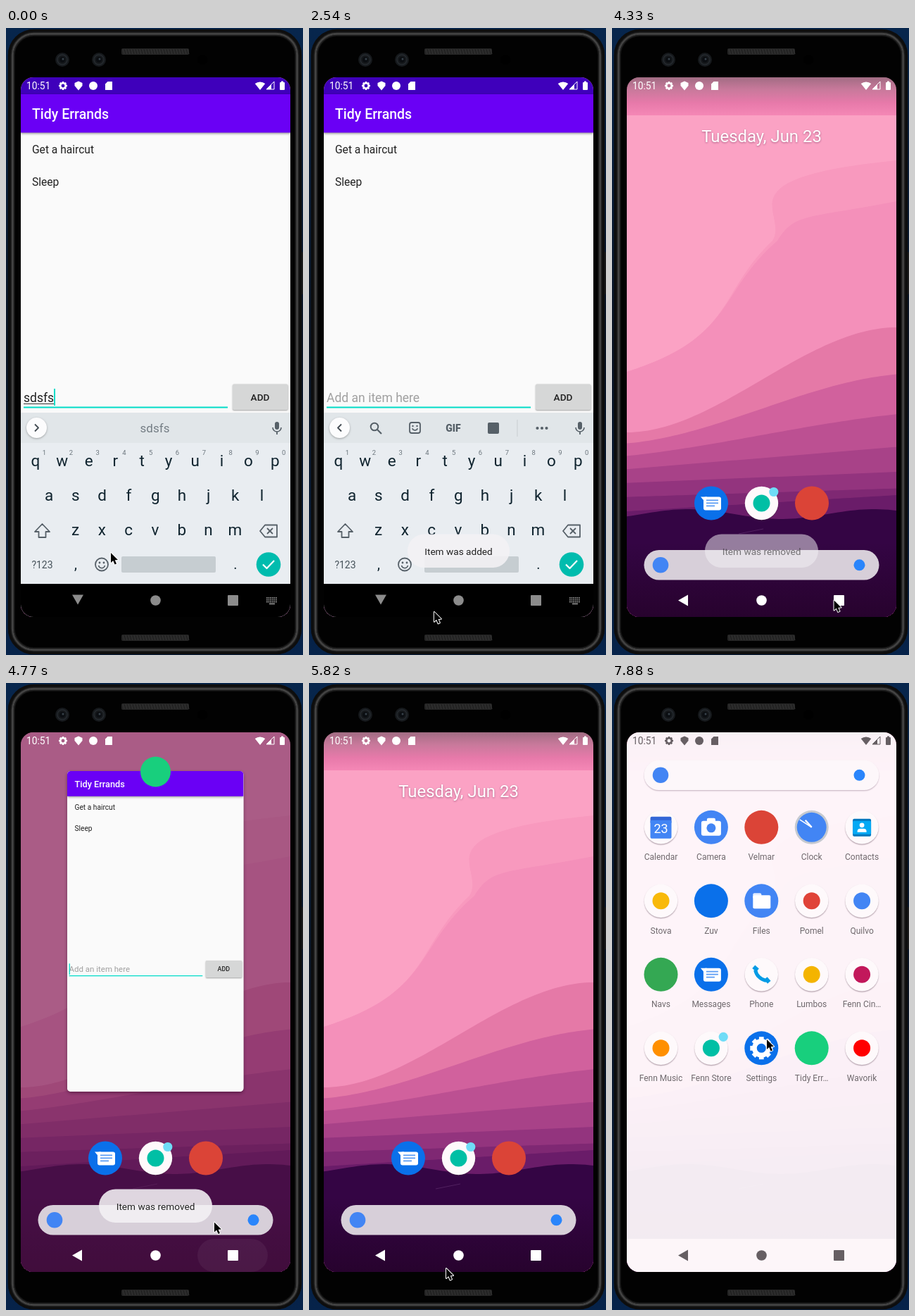
These frames come from a looping animation (422x890 px, 8000 ms). An HTML page with a canvas:

```html
<!DOCTYPE html>
<html lang="en">
<head>
<meta charset="utf-8">
<title>To-do list demo</title>
<style>
html, body { margin: 0; width: 100%; height: 100%; overflow: hidden; background: #04162f; }
canvas { display: block; width: 422px; height: 890px; }
</style>
</head>
<body>
<canvas id="stage" width="422" height="890"></canvas>
<script>
const ctx = document.getElementById('stage').getContext('2d');
const LOOP = 8000, STEP = 148.7;
const APP = 'Tidy Errands', TEAL = '#00dcc8', KEY = '#10242f', GREY = '#566068', BLUE = '#0a70ea', GREEN = '#18cf7d';
const ADD = 740, ADDED = 880, REMOVED = 2070, HOME = 3560, CLOSE = 3840, DRAG = 6800, RELEASE = 7290;

const clamp = v => Math.max(0, Math.min(1, v));
const span = (t, a, b) => clamp((t - a) / (b - a));
const mix = (a, b, k) => a + (b - a) * k;

// Drawing helpers
function box(x, y, w, h, r, fill) {
  ctx.beginPath();
  ctx.roundRect(x, y, w, h, r);
  if (fill) { ctx.fillStyle = fill; ctx.fill(); }
}
function frameBox(x, y, w, h, r, color, lw) {
  box(x, y, w, h, r);
  ctx.strokeStyle = color;
  ctx.lineWidth = lw;
  ctx.stroke();
}
function dot(x, y, r, fill) {
  ctx.beginPath();
  ctx.arc(x, y, r, 0, 7);
  ctx.fillStyle = fill;
  ctx.fill();
}
function ring(x, y, r, color, w = 1.5, a = 0, b = 7) {
  ctx.beginPath();
  ctx.arc(x, y, r, a, b);
  ctx.strokeStyle = color;
  ctx.lineWidth = w;
  ctx.stroke();
}
function trace(pts, x = 0, y = 0) {
  ctx.beginPath();
  for (let i = 0; i < pts.length; i += 2) ctx.lineTo(x + pts[i], y + pts[i + 1]);
}
function poly(pts, fill, x, y) {
  trace(pts, x, y);
  ctx.fillStyle = fill;
  ctx.fill();
}
function line(pts, color, w, x, y, close) {
  trace(pts, x, y);
  if (close) ctx.closePath();
  ctx.strokeStyle = color;
  ctx.lineWidth = w;
  ctx.stroke();
}
function text(s, x, y, size, color, align = 'left', weight = 400) {
  ctx.font = `${weight} ${size}px Roboto, sans-serif`;
  ctx.textAlign = align;
  ctx.fillStyle = color;
  ctx.fillText(s, x, y);
}
function fade(y, h, ...colors) {
  const g = ctx.createLinearGradient(0, y, 0, y + h);
  colors.forEach((c, i) => g.addColorStop(i / (colors.length - 1), c));
  return g;
}
function shadow(color, blur, dy) {
  ctx.shadowColor = color;
  ctx.shadowBlur = blur;
  ctx.shadowOffsetY = dy;
}
function group(alpha, draw) {
  if (alpha <= 0) return;
  ctx.save();
  ctx.globalAlpha *= alpha;
  draw();
  ctx.restore();
}
function gear(x, y, r, color) {
  for (let i = 0; i < 8; i++) {
    const a = i * Math.PI / 4, c = r * Math.cos(a), s = r * Math.sin(a);
    line([c * .6, s * .6, c, s], color, r * .42, x, y);
  }
  ring(x, y, r * .62, color, r * .42);
}

// Pointer strokes: start, end, and where each one leads
const MOVES = [
  [100, ADD, 362, 522], [900, 1487, 159, 265], [2240, 2520, 177, 829], [2520, 2830, 211, 823],
  [3900, 4330, 320, 812], [4480, 4758, 296, 766], [4758, 5353, 225, 53], [5353, 5700, 195, 831],
  [5900, DRAG, 183, 632], [DRAG, RELEASE, 177, 279], [RELEASE, 7881, 220, 506]
];
function pointerAt(t) {
  return MOVES.reduce(([x, y], [a, b, toX, toY]) => {
    const k = span(t, a, b);
    return [mix(x, toX, k), mix(y, toY, k)];
  }, [149, 745]);
}
// The drawer follows the drag, then settles by itself
function drawerAt(t) {
  if (t < DRAG) return 0;
  const pulled = (632 - pointerAt(Math.min(t, RELEASE))[1]) / 631.5;
  return mix(pulled, 1, 1 - (1 - span(t, RELEASE, 7590)) ** 2);
}
function pointer(t) {
  const arrow = [0, 0, 0, 14, 3.2, 11, 5.6, 16.5, 8, 15.4, 5.7, 10.2, 10, 10];
  ctx.lineJoin = 'round';
  line(arrow, '#fff', 2, ...pointerAt(t), true);
  poly(arrow, '#000', ...pointerAt(t));
}

// Phone
function body() {
  ctx.fillStyle = fade(0, 890, '#07264d', '#0b1524', '#06234a');
  ctx.fillRect(0, 0, 422, 890);
  box(419, 318, 3, 60, 1, '#1c1d1f');
  box(3, 2, 417, 887, 37, '#0a0a0a');
  for (let i = 0; i < 9; i++) {
    const v = 14 + 62 * Math.exp(-(((i - 6) / 1.7) ** 2));
    frameBox(3.5 + i, 2.5 + i, 416 - 2 * i, 886 - 2 * i, 36 - i, `rgb(${v},${v},${v})`, 1.4);
  }
  box(13, 12, 397, 867, 27, '#020202');
  for (const y of [29, 861]) {
    box(164, y, 96, 9, 2, '#242424');
    for (let x = 166; x < 260; x += 4) line([x, y + 1, x + 2, y + 8], '#353535', 1);
  }
  for (const x of [80, 132]) {
    dot(x, 45, 10, '#16191c');
    ring(x, 45, 7, '#252a2f', 1.5);
    dot(x, 45, 4, '#0b0e12');
    dot(x + 1, 44, 1.5, '#38424a');
  }
  dot(279, 45, 7, '#000');
}

function statusBar(color) {
  text('10:51', 29, 87, 13.8, color);
  gear(81, 82, 6, color);
  poly([0, -6.5, 5.5, -4, 5.5, 0, 0, 6.5, -5.5, 0, -5.5, -4], color, 103, 82);
  dot(124, 82, 6, color);
  poly([0, 3.5, 3.5, 0, 10, 0, 10, 12, 0, 12], color, 141, 76);
  ctx.beginPath();
  ctx.moveTo(361, 88);
  ctx.arc(361, 88, 11.5, -2.25, -.89);
  ctx.fill();
  line([0, 0, 11, 0, 11, -11], color, 1, 370, 87, true);
  poly([0, 0, 7, 0, 7, -7], color, 370, 87);
  box(389, 77, 7, 11, 1, color);
  box(391, 75.5, 3, 2, 0, color);
}

function navIcons(color, keyboard) {
  if (keyboard) poly([-8, -6.5, 8, -6.5, 0, 7.5], color, 102, 811);
  else poly([7, -8, 7, 8, -7, 0], color, 101, 812.5);
  dot(212.5, 812.5, 7.3, color);
  box(315, 805, 15, 15, 1, color);
}

// To-do screen
function todo(t) {
  box(21, 94, 383, 742, 0, '#fafafa');
  group(1, () => {
    shadow('rgba(0,0,0,.4)', 3, 1);
    box(21, 94, 383, 54.5, 0, '#6a00f5');
  });
  text(APP, 37, 128.5, 19.5, '#fff', 'left', 500);
  const added = t >= ADDED, rows = ['Get a haircut', 'Sleep'];
  if (added && t < REMOVED) rows.push('sdsfs');
  rows.forEach((s, i) => text(s, 37, 177.5 + i * 46.8, 15.6, '#222'));

  if (added) text('Add an item here', 25, 530.5, 17.55, '#a0a0a0');
  else {
    text('sdsfs', 25, 530.5, 17.55, '#222');
    box(25, 533, 43, 1, 0, '#333');
  }
  const blink = Math.floor((t - 788) / 480) % 2 === 0;
  if (!added || t > CLOSE || blink) box(added ? 25 : 68, 512, 2, 24, 0, TEAL);
  box(25, 537.5, 290, 2, 0, TEAL);

  group(1, () => {
    shadow('rgba(0,0,0,.35)', 2, 1);
    box(322, 505.5, 78.5, 36.5, 2, t > ADD && t < 1040 ? '#bcbdbd' : '#d6d7d7');
  });
  text('ADD', 361, 528.5, 13.65, '#222', 'center', 500);
}

function toolStrip(open) {
  box(21, 546, 383, 43, 0, '#e1e6e9');
  group(1, () => {
    shadow('rgba(0,0,0,.3)', 3, 1);
    dot(43.5, 567.5, 14.5, '#fcfcfd');
  });
  const d = open ? -2.5 : 2.5;
  line([-d, -5, d, 0, -d, 5], '#424b52', 1.8, 43.5, 567.5);
  if (open) {
    ring(93, 566, 5.3, GREY, 2);
    line([97, 570, 103, 576], GREY, 2.2);
    frameBox(143, 560, 15, 15, 3, GREY, 1.8);
    for (const x of [147.5, 153.5]) dot(x, 565, 1.2, GREY);
    ring(150.5, 567, 4, GREY, 1.5, .3, 2.84);
    text('GIF', 205, 572.5, 14, GREY, 'center', 900);
    box(254, 560, 16, 16, 2, GREY);
    box(295.5, 556, 1, 24, 0, '#c9ced2');
    for (const x of [324.5, 331, 337.5]) dot(x, 568, 2.1, GREY);
  } else text('sdsfs', 211.5, 574, 17, '#747d84', 'center');
  box(382, 559, 6, 11, 3, GREY);
  ring(385, 567, 6, GREY, 1.6, 0, Math.PI);
  line([385, 573, 385, 577], GREY, 1.8);
}

function keyboard(t) {
  box(21, 588, 383, 201, 0, '#e9edf1');
  toolStrip(t >= ADDED);
  const row = (keys, x, y) => [...keys].forEach((c, i) => text(c, x + i * 37.8, y, 22.5, KEY, 'center'));
  row('qwertyuiop', 42, 621.5);
  row('asdfghjkl', 61, 670.5);
  row('zxcvbnm', 98.5, 720);
  for (let i = 0; i < 10; i++) text((i + 1) % 10, 54.5 + i * 37.8, 606, 9.5, '#6c767d', 'center');
  line([0, -10, 10.5, 1, 5, 1, 5, 9, -5, 9, -5, 1, -10.5, 1], GREY, 1.8, 51.5, 714, true);
  line([-12, 0, -5, -8.5, 12, -8.5, 12, 8.5, -5, 8.5], GREY, 1.8, 373, 714, true);
  for (const d of [-4, 4]) line([-2, d, 6, -d], GREY, 1.8, 373, 714);
  text('?123', 51.5, 767, 14, '#46525a', 'center');
  text(',', 99, 768, 20, KEY, 'center');
  ring(136, 761.5, 9, GREY, 1.8);
  for (const x of [133, 139]) dot(x, 759, 1.4, GREY);
  ring(136, 762, 4.6, GREY, 1.7, .2, 2.94);
  box(164, 750, 134, 23, 2, '#c6cdd1');
  text('.', 326, 768, 20, KEY, 'center');
  dot(373, 761.5, 17.3, '#00bcae');
  line([-8, 0, -2.5, 5.5, 8, -5.5], '#fff', 2.2, 373, 761.5);
}

function appScreen(t) {
  const dy = 112 * span(t, CLOSE, CLOSE + 250) ** 1.5, home = t > HOME;
  group(1, () => {
    ctx.translate(0, dy);
    box(21, 70, 383, 24.5, 0, '#3f00bb');
    todo(t);
    keyboard(t);
  });
  box(21, 789 + dy, 383, 50, 0, '#000');
  if (home) box(160, 789 + dy, 105, 47 - dy, 23, '#222');
  navIcons(home ? '#fff' : '#8c8c8c', true);
  if (!home) {
    for (let i = 0; i < 18; i++)
      box(370 + i % 6 * 2.6, 808 + Math.floor(i / 6) * 2.8, 1.7, 1.8, 0, '#8c8c8c');
    box(374, 816.5, 8, 1.8, 0, '#8c8c8c');
  }
  statusBar('#fff');
}

// Launcher
function ridge(color, height) {
  ctx.beginPath();
  ctx.moveTo(21, 840);
  for (let x = 21; x <= 405; x += 6) ctx.lineTo(x, height(x));
  ctx.lineTo(405, 840);
  ctx.fillStyle = color;
  ctx.fill();
}
function cloud(color, tipX, bulge, edge) {
  ctx.beginPath();
  ctx.moveTo(21, 488);
  ctx.bezierCurveTo(175, 440, 150, 375, tipX, 302);
  ctx.bezierCurveTo(tipX + 25, 262, bulge, edge + 25, 404, edge);
  ctx.lineTo(404, 840);
  ctx.lineTo(21, 840);
  ctx.fillStyle = color;
  ctx.fill();
}
function wallpaper() {
  box(21, 70, 383, 766, 0, '#fba2c4');
  cloud('#f899be', 228, 150, 188);
  cloud('#f490ba', 235, 275, 246);
  for (let i = 0; i < 7; i++) {
    const k = i / 6, left = 574 + 112 * k ** 1.1, right = 663 - 238 * (1 - k) ** 1.8;
    ridge(`rgb(${mix(229, 106, k)},${mix(121, 28, k ** .75)},${mix(167, 105, k)})`, x => {
      const u = (x - 21) / 383;
      return mix(left, right, mix(u * u * (3 - 2 * u), u, Math.min(1, k * 2)));
    });
  }
  ridge('#340544', x => 690 - 7 * Math.cos((x - 108) / 42));
  line([180, 718, 215, 711], 'rgba(110,60,125,.5)', 1);
  box(21, 730, 383, 106, 0, fade(730, 106, 'rgba(36,2,40,0)', 'rgba(36,2,40,.8)'));
}

function white(x, y, mark) {
  group(1, () => {
    shadow('rgba(70,40,60,.4)', 1.5, 1.2);
    dot(x, y, 23.7, '#fef9fb');
  });
  if (mark) dot(x, y, 12, mark);
}
const plain = color => (x, y) => dot(x, y, 24, color);
const marked = color => (x, y) => white(x, y, color);

function calendar(x, y) {
  white(x, y);
  box(x - 15, y - 15, 30, 10, 2, '#3367d6');
  box(x - 15, y - 10, 30, 26, 2, '#4285f4');
  text('23', x, y + 8, 18, '#fff', 'center');
}
function camera(x, y) {
  dot(x, y, 24, '#4285f4');
  box(x - 6, y - 13, 12, 8, 2, '#fff');
  box(x - 14, y - 9, 28, 21, 3, '#fff');
  dot(x, y + 1, 6.5, '#4285f4');
}
function clock(x, y) {
  dot(x, y, 24, '#c5c9d0');
  dot(x, y, 21, '#4285f4');
  line([-17, -11, 0, 0], '#fff', 1.6, x, y);
  line([-9, -10, 0, 0], '#fff', 2.4, x, y);
}
function contacts(x, y) {
  white(x, y);
  box(x - 13, y - 12, 26, 25, 2, '#0277bd');
  box(x - 13, y - 9, 26, 19, 2, '#03a9f4');
  dot(x, y - 3, 3.4, '#fff');
  box(x - 6.5, y + 2, 13, 5, [4, 4, 0, 0], '#fff');
}
function folder(x, y) {
  dot(x, y, 24, '#4285f4');
  box(x - 12, y - 11, 12, 8, 2, '#e3edff');
  box(x - 12, y - 8, 25, 19, 2, '#fff');
}
function bubble(x, y) {
  dot(x, y, 24, BLUE);
  box(x - 11, y - 9, 25, 19, 3, '#fff');
  poly([-15, -9, -6, -9, -9, -2], '#fff', x, y);
  for (const d of [-5, -1, 3]) box(x - 7, y + d, d > 2 ? 12 : 17, 1.8, 0, '#5a9cf4');
}
function handset(x, y) {
  white(x, y);
  ring(x + 10, y - 10, 19, '#039be5', 5, 1.75, 2.95);
  line([-11, -11, -5.5, -6], '#039be5', 6, x, y);
  line([6, 5.5, 11, 11], '#039be5', 6, x, y);
}
function settings(x, y) {
  dot(x, y, 24, BLUE);
  gear(x, y, 16, '#fff');
}
function store(x, y) {
  white(x, y, '#00bfa5');
  dot(x + 17.3, y - 16, 6.6, '#6fdcf7');
}
const browser = plain('#db4437');
const APPS = [
  ['Calendar', calendar], ['Camera', camera], ['Velmar', browser], ['Clock', clock], ['Contacts', contacts],
  ['Stova', marked('#f8b90a')], ['Zuv', plain(BLUE)], ['Files', folder], ['Pomel', marked('#e04338')], ['Quilvo', marked('#4285f4')],
  ['Navs', plain('#34a853')], ['Messages', bubble], ['Phone', handset], ['Lumbos', marked('#f4b400')], ['Fenn Cin…', marked('#c2185b')],
  ['Fenn Music', marked('#ff8f00')], ['Fenn Store', store], ['Settings', settings], ['Tidy Err…', plain(GREEN)], ['Wavorik', marked('#f00')]
];

function searchBar(y, raised) {
  group(1, () => {
    if (raised) shadow('rgba(90,50,80,.3)', 1.5, 1.2);
    box(45.5, y - 21.3, 334, 42.6, 21.3, raised ? '#fdf7fa' : '#d7cfd9');
  });
  dot(69, y, 11.3, '#4285f4');
  dot(351.5, y, 8, '#2a85fb');
}

function card(t, shown) {
  const lift = 620 * span(t, 5040, 5380), k = mix(.9, 1, shown);
  group(shown * (1 - span(t, 5200, 5400)), () => {
    ctx.translate(212.5, 352 - lift);
    ctx.scale(k, k);
    ctx.translate(-212.5, -352);
    group(1, () => {
      shadow('rgba(30,0,25,.45)', 5, 2);
      box(87, 125, 250.5, 455, 5, '#fafafa');
    });
    group(1, () => {
      box(87, 125, 250.5, 455, 5);
      ctx.clip();
      ctx.translate(87, 125);
      ctx.scale(.654, .654);
      ctx.translate(-21, -94);
      todo(t);
    });
    dot(212.5, 126, 21.5, GREEN);
  });
}

function drawer(p) {
  const top = 70 + 643 * (1 - p);
  const alpha = p < .38 ? p * 2.28 : mix(.865, .945, (p - .38) / .62);
  box(21, top, 383, 840 - top, [12, 12, 0, 0], `rgba(254,249,252,${alpha})`);
  group(clamp(p * 1.16), () => APPS.forEach(([name, icon], i) => {
    const x = 69.5 + i % 5 * 71.4, y = 204.8 + Math.floor(i / 5) * 104.5 + 631.5 * (1 - p);
    icon(x, y);
    text(name, x, y + 46.3, 12, '#6f696d', 'center');
  }));
}

function launcher(t) {
  const recents = span(t, 4440, 4750) * (1 - span(t, 5360, 5640));
  const p = drawerAt(t), light = p > .8, ink = light ? '#665f63' : '#fff';
  const faded = 1 - p / .4;
  wallpaper();
  group(1 - recents, () => box(21, 70, 383, 54, 0,
    fade(70, 54, 'rgba(70,55,65,.5)', 'rgba(120,55,90,.38)', 'rgba(200,60,130,.4)', 'rgba(236,95,160,.4)')));
  box(21, 70, 383, 766, 0, `rgba(90,25,75,${recents * .5 + Math.sin(p * Math.PI) * .19})`);
  group(faded * (1 - recents), () => {
    shadow('rgba(90,30,70,.5)', 3, 1);
    text('Tuesday, Jun 23', 212.5, 162 - 83 * p, 23.9, '#fff', 'center');
  });
  card(t, recents);
  group(faded, () => [bubble, store, browser].forEach((icon, i) => icon(141 + i * 71.5, 674.5 - 86 * p)));
  if (p > 0) drawer(p);
  searchBar(762.3 - 631.5 * p, p > .1);

  if (light) box(21, 789, 383, 47, 0, '#fdf6f9');
  const ripple = span(t, 4400, 4500) * (1 - span(t, 4600, 4950));
  box(272, 789, 100, 47, 23.5, `rgba(255,255,255,${ripple * .09})`);
  navIcons(ink, false);
  statusBar(ink);
}

function toast(s, half, t, from, to) {
  group(span(t, from, from + 400) * (1 - span(t, to, to + 400)), () => {
    box(212.5 - half, 718.5, half * 2, 47.5, 23.7, 'rgba(244,242,245,.88)');
    text(s, 212.5, 747.5, 13.65, '#222', 'center');
  });
}

function draw(t) {
  body();
  group(1, () => {
    box(21, 70, 383, 766, 18);
    ctx.clip();
    if (t < CLOSE + 150) {
      wallpaper();
      appScreen(t);
    } else launcher(t);
    toast('Item was added', 72.5, t, 1030, 2800);
    toast('Item was removed', 80.5, t, 4080, 5350);
  });
  pointer(t);
}

const start = performance.now();
function frame() {
  const t = (performance.now() - start) % LOOP;
  draw(Math.floor((t + 4) / STEP) * STEP);
  requestAnimationFrame(frame);
}
frame();
</script>
</body>
</html>
```
